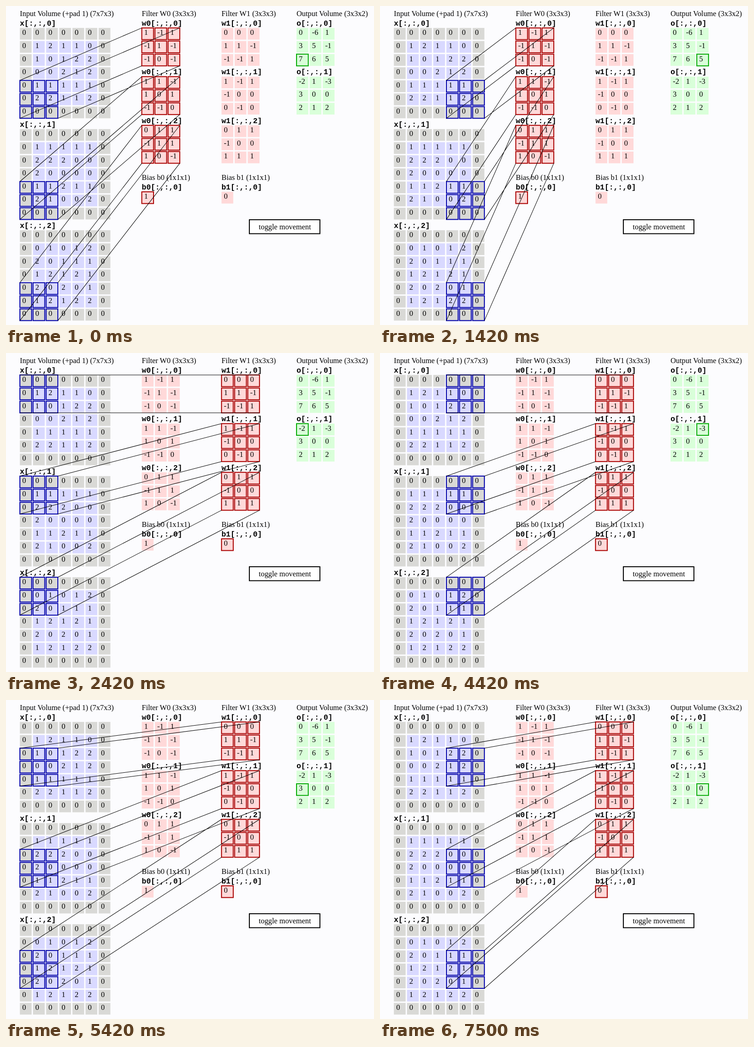
An HTML page that plays this animation: 803 px wide and 697 px high, repeating every 8000 ms.

```html
<!DOCTYPE html>
<html lang="en">
<head>
<meta charset="utf-8">
<title>Convolution demo</title>
<style>
html, body { margin: 0; width: 100%; height: 100%; overflow: hidden; background: #fcfcfe; }
svg { display: block; }
text { font: 16px "Liberation Serif", Times, serif; white-space: pre; }
.label { font: bold 16px "Liberation Mono", Courier, monospace; }
</style>
</head>
<body>
<svg id="stage" width="803" height="697" viewBox="0 0 803 697">
  <g id="scene" transform="translate(30.3 47.9) scale(1.0232)"></g>
</svg>
<script>
const NS = 'http://www.w3.org/2000/svg';
const scene = document.getElementById('scene');
const CELL = 25, PITCH = 28, GAP = 20;
const BLUE = '#d9d9ff', GRAY = '#d9d9d6', RED = '#ffd9d9', GREEN = '#d9ffd9';
const LOOP = 8000;
const changes = [420, 1420, 2420, 3420, 4420, 5420, 6420, 7500];
const FIRST = 6; // the loop opens at the seventh output cell

const inputs = [
  '1 2 1 1 0/1 0 1 2 2/0 0 2 1 2/1 1 1 1 1/2 2 1 1 2',
  '1 1 1 1 1/2 2 2 0 0/2 0 0 0 0/1 1 2 1 1/2 1 0 0 2',
  '0 1 0 1 2/2 0 1 1 1/1 2 1 2 1/2 0 2 0 1/1 2 1 2 2'
];
const filters = [
  ['1 -1 1/-1 1 -1/-1 0 -1', '1 1 -1/1 0 1/-1 -1 0', '0 1 1/-1 1 1/1 0 -1'],
  ['0 0 0/1 1 -1/-1 -1 1', '1 -1 1/-1 0 0/0 -1 0', '0 1 1/-1 0 0/1 1 1']
];
const outputs = ['0 -6 1/3 5 -1/7 6 5', '-2 1 -3/3 0 0/2 1 2'];
const filterX = [260, 430], outX = 590, biasY = 350;

function add(parent, tag, attrs, content) {
  const el = document.createElementNS(NS, tag);
  for (const key in attrs) el.setAttribute(key, attrs[key]);
  if (content !== undefined) el.textContent = content;
  parent.appendChild(el);
  return el;
}

const top7 = d => d * (7 * PITCH + GAP);
const top3 = d => d * (3 * PITCH + GAP);

function write(x, y, content, cls = '') {
  add(scene, 'text', { x, y, class: cls }, content);
}

function grid(x, y, name, data, color) {
  write(x, y - 5, name, 'label');
  const rows = data.split('/').map(row => row.split(' '));
  rows.forEach((row, r) => row.forEach((value, c) => {
    const edge = row.length === 7 && (r % 6 === 0 || c % 6 === 0);
    const cx = x + c * PITCH, cy = y + r * PITCH;
    add(scene, 'rect', { x: cx, y: cy, width: CELL, height: CELL, fill: edge ? GRAY : color });
    write(cx + 5, cy + 15, value);
  }));
}

function pad(data) {
  const zeros = '0 0 0 0 0 0 0';
  return [zeros, ...data.split('/').map(row => `0 ${row} 0`), zeros].join('/');
}

write(0, -25, 'Input Volume (+pad 1) (7x7x3)');
inputs.forEach((data, d) => grid(0, top7(d), `x[:,:,${d}]`, pad(data), BLUE));
filters.forEach((slices, f) => {
  const x = filterX[f];
  write(x, -25, `Filter W${f} (3x3x3)`);
  slices.forEach((data, d) => grid(x, top3(d), `w${f}[:,:,${d}]`, data, RED));
  write(x, biasY - 25, `Bias b${f} (1x1x1)`);
  grid(x, biasY, `b${f}[:,:,0]`, f ? '0' : '1', RED);
});
write(outX, -25, 'Output Volume (3x3x2)');
outputs.forEach((data, d) => grid(outX, top3(d), `o[:,:,${d}]`, data, GREEN));

const stage = document.getElementById('stage');
add(stage, 'rect', { x: 531, y: 467, width: 154, height: 30.5, fill: '#fff', stroke: '#000', 'stroke-width': 2 });
add(stage, 'text', { x: 608.5, y: 488, 'text-anchor': 'middle', style: 'font-size:16.37px' }, 'toggle movement');

const marks = add(scene, 'g', { fill: 'none', 'stroke-width': 2 });
const links = add(scene, 'path', { fill: 'none', stroke: '#000', 'stroke-width': 1 });

function frame(x, y, stroke, count = 1) {
  for (let i = 0; i < count * count; i++) {
    add(marks, 'rect', {
      x: x + i % count * PITCH, y: y + Math.floor(i / count) * PITCH,
      width: CELL, height: CELL, stroke
    });
  }
}

function show(step) {
  const pos = FIRST + step;
  const f = Math.floor(pos / 9), row = Math.floor(pos % 9 / 3), col = pos % 3;
  const span = 2 * PITCH + CELL, fx = filterX[f], px = col * 2 * PITCH;
  let path = '';
  marks.replaceChildren();
  for (let d = 0; d < 3; d++) {
    const py = top7(d) + row * 2 * PITCH, fy = top3(d);
    frame(px, py, '#0000aa', 3);
    frame(fx, fy, '#aa0000', 3);
    for (const dy of [0, span]) {
      for (const dx of [0, span]) path += `M${px + dx} ${py + dy}L${fx + dx} ${fy + dy}`;
    }
  }
  frame(fx, biasY, '#aa0000');
  frame(outX + col * PITCH, top3(f) + row * PITCH, '#00aa00');
  links.setAttribute('d', path);
}

let current = -1;
function render(time) {
  const t = time % LOOP;
  const step = changes.filter(c => t >= c).length;
  if (step !== current) show(current = step);
}

const start = performance.now();
function tick() {
  render(performance.now() - start);
  requestAnimationFrame(tick);
}
tick();
</script>
</body>
</html>
```
